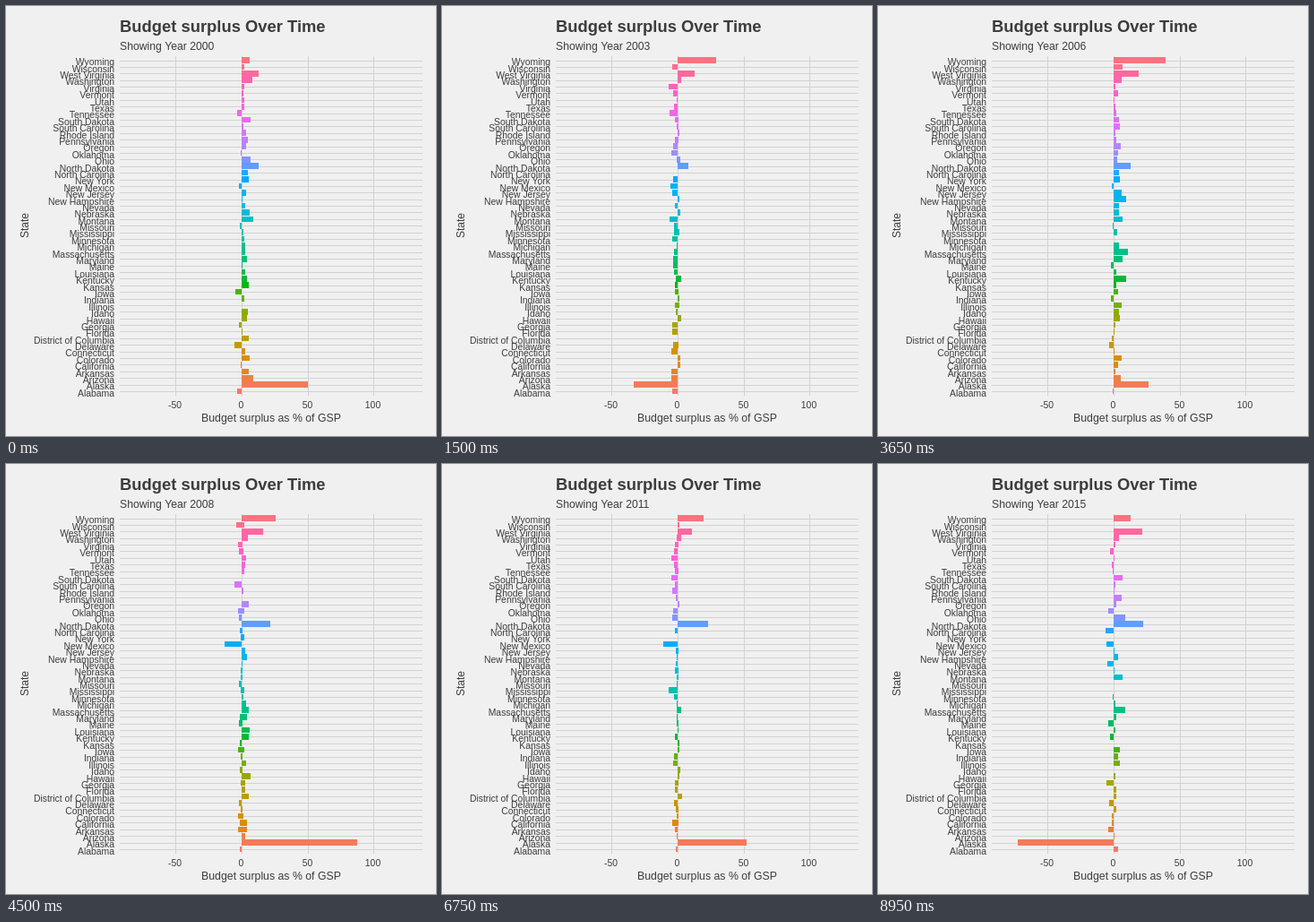
Recreate the animation shown at these times as an HTML page with a canvas. Size 480 px wide and 480 px high, loop 9 s.

```html
<!DOCTYPE html>
<html lang="en">
<head>
<meta charset="utf-8">
<title>Budget surplus Over Time</title>
<style>
  html, body { margin: 0; width: 100%; height: 100%; overflow: hidden; background: #f0f0f0; }
  canvas { display: block; }
</style>
</head>
<body>
<canvas id="chart" width="480" height="480"></canvas>
<script>
const ctx = document.getElementById("chart").getContext("2d", { alpha: false });
const FONT = '"Liberation Sans", Arial, sans-serif';
const STEPS = 180, STEP_MS = 50, FIRST_YEAR = 2000, SPANS = 15;
const ZERO_X = 263, LEFT = 127, RIGHT = 465, TOP = 56, BOTTOM = 435;
const ROW = 7.3895, LAST_ROW_Y = 430;

const NAMES = `Alabama,Alaska,Arizona,Arkansas,California,Colorado,Connecticut,Delaware,
District of Columbia,Florida,Georgia,Hawaii,Idaho,Illinois,Indiana,Iowa,Kansas,Kentucky,
Louisiana,Maine,Maryland,Massachusetts,Michigan,Minnesota,Mississippi,Missouri,Montana,
Nebraska,Nevada,New Hampshire,New Jersey,New Mexico,New York,North Carolina,North Dakota,
Ohio,Oklahoma,Oregon,Pennsylvania,Rhode Island,South Carolina,South Dakota,Tennessee,Texas,
Utah,Vermont,Virginia,Washington,West Virginia,Wisconsin,Wyoming`.split(/,\s*/);

// Key points are [years since 2000, bar length in pixels].
const CYCLE = [[0, 4], [1, -2], [4, -1], [6, 5], [7, 5], [9, -5], [11, -1], [15, 2]];
const STANDOUTS = {
  "Alaska": [[0, 74], [1, -121], [2, -63], [4, -8], [7, 60], [8, 187], [9, 47], [11, 67], [12, 97], [13, 49], [15, -107]],
  "Wyoming": [[0, 9], [3, 50], [4, 21], [6, 60], [7, 36], [9, 42], [11, 30], [15, 19]],
  "North Dakota": [[0, 19], [1, 10], [6, 18], [8, 36], [12, 33], [14, 50], [15, 33]],
  "West Virginia": [[0, 19], [1, 23], [4, 14], [6, 28], [11, 14], [15, 32]],
  "New Mexico": [[0, -3], [4, -11], [6, -1], [9, -35], [11, -17], [15, -8]],
};

const lerp = (a, b, t) => a + (b - a) * t;
const keyStep = year => Math.round(year * (STEPS - 1) / SPANS);

function along(points, x) {
  const i = Math.max(1, points.findIndex(p => p[0] >= x));
  const [[x0, y0], [x1, y1]] = [points[i - 1], points[i]];
  return lerp(y0, y1, (x - x0) / (x1 - x0));
}

// Seeded, bell-shaped noise within -1..1.
function noise(a, b) {
  const hash = k => {
    const s = Math.sin(a * 12.9898 + b * 78.233 + k * 37.719) * 43758.5453;
    return s - Math.floor(s);
  };
  return (hash(1) + hash(2) + hash(3)) / 1.5 - 1;
}

// Most states follow the common cycle with a lasting lean and yearly scatter.
function balance(name, index, year) {
  if (STANDOUTS[name]) return along(STANDOUTS[name], year);
  return along(CYCLE, year) + 6 * noise(index, 100) + 13 * noise(index, year);
}

// Evenly spaced hues in polar CIE LUV, chroma 100, lightness 65.
function hueColor(degrees) {
  const angle = degrees * Math.PI / 180, L = 65, C = 100;
  const Y = ((L + 16) / 116) ** 3;
  const u = C * Math.cos(angle) / (13 * L) + 0.19784;
  const v = C * Math.sin(angle) / (13 * L) + 0.46834;
  const X = 9 * Y * u / (4 * v);
  const Z = -X / 3 - 5 * Y + 3 * Y / v;
  const channel = c => {
    const s = c > 0.00304 ? 1.055 * c ** (1 / 2.4) - 0.055 : 12.92 * c;
    return Math.round(255 * Math.min(1, Math.max(0, s)));
  };
  const r = channel(3.240479 * X - 1.53715 * Y - 0.498535 * Z);
  const g = channel(-0.969256 * X + 1.875992 * Y + 0.041556 * Z);
  const b = channel(0.055648 * X - 0.204043 * Y + 1.057311 * Z);
  return `rgb(${r}, ${g}, ${b})`;
}

const states = NAMES.map((name, i) => ({
  name,
  y: LAST_ROW_Y - i * ROW,
  color: hueColor(15 + 360 * i / NAMES.length),
  series: Array.from({ length: SPANS + 1 }, (_, year) => balance(name, i, year)),
}));

function text(str, x, y, size, align = "left", weight = "") {
  ctx.font = `${weight} ${size}px ${FONT}`;
  ctx.textAlign = align;
  ctx.fillStyle = "#3c3c3c";
  ctx.fillText(str, x, y);
}

function drawAxes(year) {
  ctx.fillStyle = "#f0f0f0";
  ctx.fillRect(0, 0, 480, 480);
  ctx.fillStyle = "#d2d2d2";
  for (const s of states) ctx.fillRect(LEFT, Math.round(s.y), RIGHT - LEFT, 1);
  for (const value of [-50, 0, 50, 100]) {
    const x = Math.round(ZERO_X + value * 1.474);
    ctx.fillStyle = "#d2d2d2";
    ctx.fillRect(x, TOP, 1, BOTTOM - TOP);
    text(value, x - 0.5, 449, 10.4, "center");
  }
  for (const s of states) text(s.name, 121, Math.round(s.y + 5.8), 10.4, "right");
  text("Budget surplus Over Time", 127, 29, 18.4, "left", "bold");
  text("Showing Year " + year, 127, 49, 12.2);
  text("Budget surplus as % of GSP", 296, 464, 12.3, "center");
  ctx.save();
  ctx.translate(25, 245);
  ctx.rotate(-Math.PI / 2);
  text("State", 0, 0, 12, "center");
  ctx.restore();
}

// Both ends of a bar move on their own, so a change of sign shows on both sides of zero.
function drawBar({ series, y, color }, span, t) {
  const [from, to] = [series[span], series[span + 1]];
  const x0 = Math.round(ZERO_X + lerp(Math.min(0, from), Math.min(0, to), t));
  const x1 = Math.round(ZERO_X + lerp(Math.max(0, from), Math.max(0, to), t));
  const y0 = Math.round(y - ROW * 0.45), y1 = Math.round(y + ROW * 0.45);
  ctx.fillStyle = color;
  ctx.fillRect(x0, y0, x1 - x0, y1 - y0);
}

function draw(ms) {
  const step = Math.floor(ms / STEP_MS) % STEPS;
  let span = 0;
  while (span < SPANS - 1 && step >= keyStep(span + 1)) span++;
  const start = keyStep(span);
  const t = (step - start) / (keyStep(span + 1) - start);
  drawAxes(Math.round(FIRST_YEAR + SPANS * step / (STEPS - 1)));
  for (const s of states) drawBar(s, span, t);
}

const startTime = performance.now();
function tick() {
  draw(performance.now() - startTime);
  requestAnimationFrame(tick);
}
tick();
</script>
</body>
</html>
```
